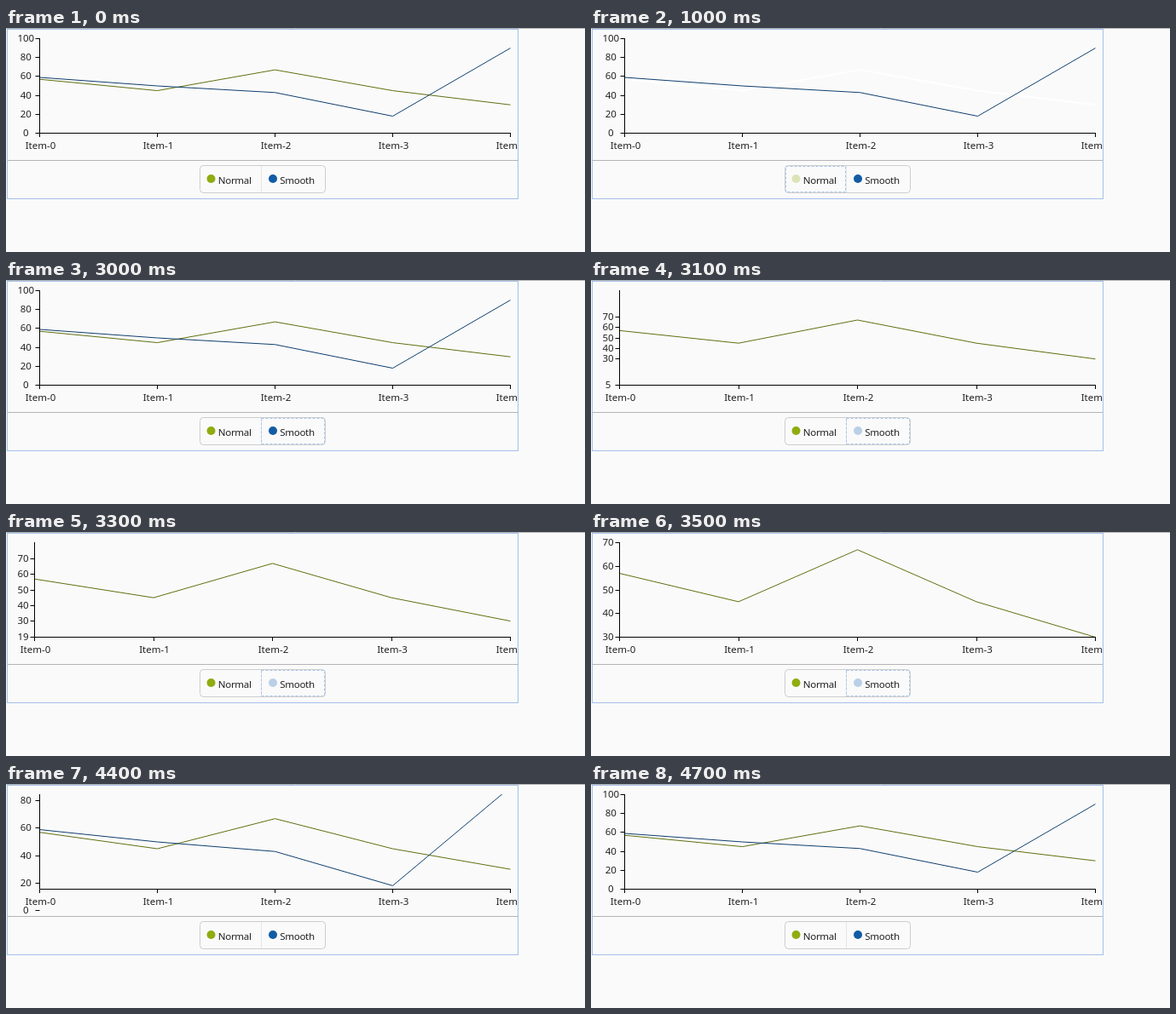
An HTML page with a canvas for the animation above (5.4 s loop, 679x263 px).

```html
<!DOCTYPE html>
<html>
<head>
<meta charset="utf-8">
<style>
html, body { margin: 0; width: 100%; height: 100%; overflow: hidden; background: #fafafa; }
canvas { display: block; }
</style>
</head>
<body>
<canvas id="stage" width="679" height="263"></canvas>
<script>
const c = document.getElementById('stage').getContext('2d');
const LOOP = 5400, STEP = 100, ZOOM = 412;
const TOP = 12.5, BASE = 123.5, RIGHT = 591.5;
const normal = { data: [57, 45, 67, 45, 30], color: '#5f7010' };
const smooth = { data: [59, 50, 43, 18, 90], color: '#0f3f6e' };

const snap = v => Math.floor(v) + 0.5;
const clamp = v => Math.max(0, Math.min(1, v));

function path(points, color, width = 1) {
  c.strokeStyle = color;
  c.lineWidth = width;
  c.beginPath();
  points.forEach(([x, y]) => c.lineTo(x, y));
  c.stroke();
}

function text(s, x, y, align = 'center', spacing = 0) {
  c.font = '11.5px "Noto Sans", sans-serif';
  c.letterSpacing = spacing + 'px';
  c.textAlign = align;
  c.fillStyle = '#222';
  c.fillText(s, x, y);
}

function clipped(x, y, w, h, draw) {
  c.save();
  c.beginPath();
  c.rect(x, y, w, h);
  c.clip();
  draw();
  c.restore();
}

function frame() {
  path([[0, 0.5], [679, 0.5]], '#b4b4b4');
  path([[2, 155.5], [600, 155.5]], '#b4b4b4');
  c.strokeStyle = '#a3c0e8';
  c.strokeRect(1.5, 1.5, 599, 199);
}

function legendItem(label, x, color, dashBox) {
  c.fillStyle = color;
  c.beginPath();
  c.arc(x, 177, 5, 0, 7);
  c.fill();
  text(label, x + 8.3, 182.5, 'left', -0.3);
  if (dashBox) {
    c.strokeStyle = '#a9c5ec';
    c.setLineDash([3, 2]);
    c.strokeRect(dashBox[0], 162.5, dashBox[1], 30);
    c.setLineDash([]);
  }
}

function legend(s) {
  c.strokeStyle = '#cdcdcd';
  c.beginPath();
  c.roundRect(227.5, 161.5, 147, 32, 4);
  c.stroke();
  path([[299.5, 162], [299.5, 193]], '#e6e6e6');
  legendItem('Normal', 240.5, s.hideNormal ? '#dce4b6' : '#8fac10', s.focus === 1 && [228.5, 70]);
  legendItem('Smooth', 313, s.hideSmooth ? '#b9d0e6' : '#125ca5', s.focus === 2 && [299.5, 74]);
}

function chart(s) {
  const left = s.hideSmooth ? 33.5 : 39.5;
  const px = i => left + (RIGHT - left) * i / 4;
  const py = v => BASE - (v - s.min) / (s.max - s.min) * (BASE - TOP);
  const points = series => series.data.map((v, i) => [px(i), py(v)]);

  clipped(left, 12, 592 - left, 112, () => {
    path(points(normal), s.hideNormal ? '#fff' : normal.color, s.hideNormal ? 2 : 1);
    if (!s.hideSmooth) path(points(smooth), smooth.color);
  });

  clipped(2, 2, 598, 153, () => {
    path([[left, 12], [left, BASE], [RIGHT + 0.5, BASE]], '#000');
    const ticks = s.hideSmooth ? [30, 40, 50, 60, 70] : [0, 20, 40, 60, 80, 100];
    if (s.hideSmooth && s.min < 30) ticks.unshift(s.min);
    for (const v of ticks) {
      const y = snap(py(v));
      path([[left - 5, y], [left, y]], '#000');
      text(Math.floor(v), s.hideSmooth ? 20 : 23.3, y + 3.7);
    }
    for (let i = 0; i < 5; i++) {
      const x = snap(px(i));
      path([[x, BASE], [x, 128]], '#000');
      text('Item-' + i, px(i) + 1, 142);
    }
  });
}

function stateAt(t) {
  const hideSmooth = t >= 3100 && t < 4200;
  // 0 is the full range, 1 the range of the Normal series alone
  const zoom = t < 4200 ? clamp((t - 3030) / ZOOM) * hideSmooth : 1 - clamp((t - 4200) / ZOOM);
  return {
    hideSmooth,
    hideNormal: t >= 1000 && t < 2100,
    focus: t >= 900 && t < 2100 ? 1 : t >= 3000 && t < 4200 ? 2 : 0,
    min: 30 * zoom,
    max: 100 - 30 * zoom
  };
}

function draw() {
  const t = Math.floor(performance.now() % LOOP / STEP) * STEP;
  const s = stateAt(t);
  c.fillStyle = '#fafafa';
  c.fillRect(0, 0, 679, 263);
  frame();
  chart(s);
  legend(s);
  requestAnimationFrame(draw);
}
draw();
</script>
</body>
</html>
```
